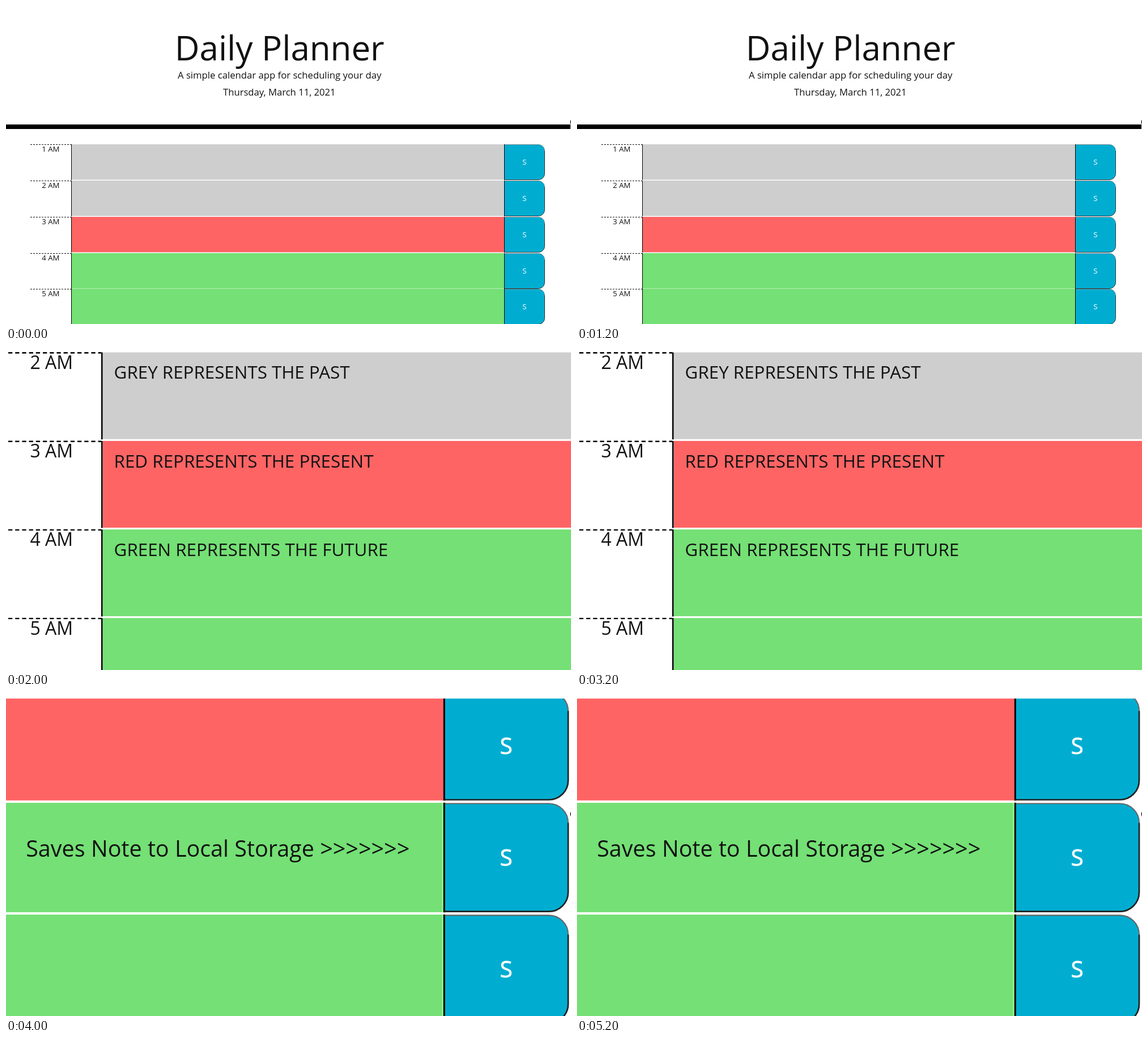
Write an HTML page that moves like this. It is 997 px wide and 561 px high and loops after 6000 ms.

```html
<!DOCTYPE html>
<html lang="en">
<head>
<meta charset="utf-8">
<title>Daily Planner</title>
<style>
html, body { margin: 0; width: 100%; height: 100%; overflow: hidden; background: #fff; }
svg { display: block; width: 997px; height: 561px; font-family: "Open Sans", sans-serif; }
</style>
</head>
<body>
<svg id="stage" viewBox="0 0 997 561"></svg>
<script>
const NS = 'http://www.w3.org/2000/svg';
const GREY = '#cecece', RED = '#ff6464', GREEN = '#74e075', BLUE = '#00add1';
const SCENE_MS = 2000;
const stage = document.getElementById('stage');

function add(parent, tag, attrs) {
  const node = document.createElementNS(NS, tag);
  for (const key in attrs) node.setAttribute(key, attrs[key]);
  parent.appendChild(node);
  return node;
}

function rect(g, x, y, width, height, fill) {
  return add(g, 'rect', { x, y, width, height, fill });
}

function text(g, str, x, y, size, attrs) {
  add(g, 'text', { x, y, 'font-size': size, fill: '#111', ...attrs }).textContent = str;
}

function line(g, d, stroke, width, dash) {
  const node = add(g, 'path', { d, stroke, fill: 'none', 'stroke-width': width });
  if (dash) node.setAttribute('stroke-dasharray', dash);
}

// Save button: square on the left, rounded on the right
function button(g, x, y, w, h, r, k) {
  const R = x + w, B = y + h;
  const top = `H${R - r}A${r} ${r} 0 0 1 ${R} ${y + r}`;
  const side = `V${B - r}A${r} ${r} 0 0 1 ${R - r} ${B}H${x}`;
  add(g, 'path', { d: `M${x} ${y}${top}${side}Z`, fill: BLUE });
  line(g, `M${x} ${y}${top}`, '#666', k * 0.7);
  line(g, `M${R} ${y + r}${side}`, '#222', k * 0.9);
  line(g, `M${x} ${y - k / 2}V${B + k / 2}`, '#000', k);
}

// Sliver of a round shape cut off by the right edge
function sliver(g) {
  line(g, 'M997.8 200.5Q995.3 204.5 997.5 208.5', '#000', 1.4);
}

function overview(g) {
  text(g, 'Daily Planner', 297.8, 95.5, 60);
  text(g, 'A simple calendar app for scheduling your day', 303, 128, 16.7);
  text(g, 'Thursday, March 11, 2021', 383, 158, 16.65);
  rect(g, 0, 209, 996, 8, '#000');
  sliver(g);
  [GREY, GREY, RED, GREEN, GREEN].forEach((fill, i) => {
    const y = Math.round(244.2 + i * 63.8);
    line(g, `M43 ${y + 0.5}H115`, '#000', 1, '3 2');
    rect(g, 116, y, 763, 62.5, fill);
    rect(g, 115, y, 1, 63, '#000');
    text(g, `${i + 1} AM`, 63.3, y + 12.5, 13.2);
    button(g, 879.5, y + 0.5, 71, 62, 11, 1);
    text(g, 'S', 915, y + 36.3, 13.3, { fill: '#fff', 'text-anchor': 'middle' });
  });
}

function colours(g) {
  const rows = [
    [GREY, 'GREY REPRESENTS THE PAST'],
    [RED, 'RED REPRESENTS THE PRESENT'],
    [GREEN, 'GREEN REPRESENTS THE FUTURE'],
    [GREEN, '']
  ];
  rows.forEach(([fill, note], i) => {
    const y = 0.7 + i * 156.2;
    rect(g, 171, y, 826, 153, fill);
    rect(g, 168, y, 2.6, 153.5, '#000');
    line(g, `M4 ${y + 0.8}H168`, '#000', 2.4, '7.3 4.9');
    text(g, `${i + 2} AM`, 42.4, y + 29.3, 32);
    text(g, note, 190.6, y + 46.6, 31.3);
  });
}

function saving(g) {
  [RED, GREEN, GREEN].forEach((fill, i) => {
    const y = -12.3 + i * 197.2;
    rect(g, 0, y, 772, 193, fill);
    if (i) rect(g, 769, y, 2.4, 193, '#8ff58c');
    button(g, 773.3, y + 1.3, 218.7, 190.5, 34, 3);
    text(g, 'S', 882.5, y + 110.8, 40.5,
      { fill: '#fff', stroke: '#fff', 'stroke-width': 0.8, 'text-anchor': 'middle' });
  });
  rect(g, 0, 0, 997, 1, '#fff');
  text(g, 'Saves Note to Local Storage >>>>>>>', 35.2, 279.7, 39.5);
  sliver(g);
}

const scenes = [overview, colours, saving].map(draw => {
  const g = add(stage, 'g', {});
  draw(g);
  return g;
});

function show(ms) {
  const now = Math.floor(ms / SCENE_MS) % scenes.length;
  scenes.forEach((g, i) => g.setAttribute('display', i === now ? 'inline' : 'none'));
}

const start = performance.now();
function tick() {
  show(performance.now() - start);
  requestAnimationFrame(tick);
}
tick();
</script>
</body>
</html>
```
